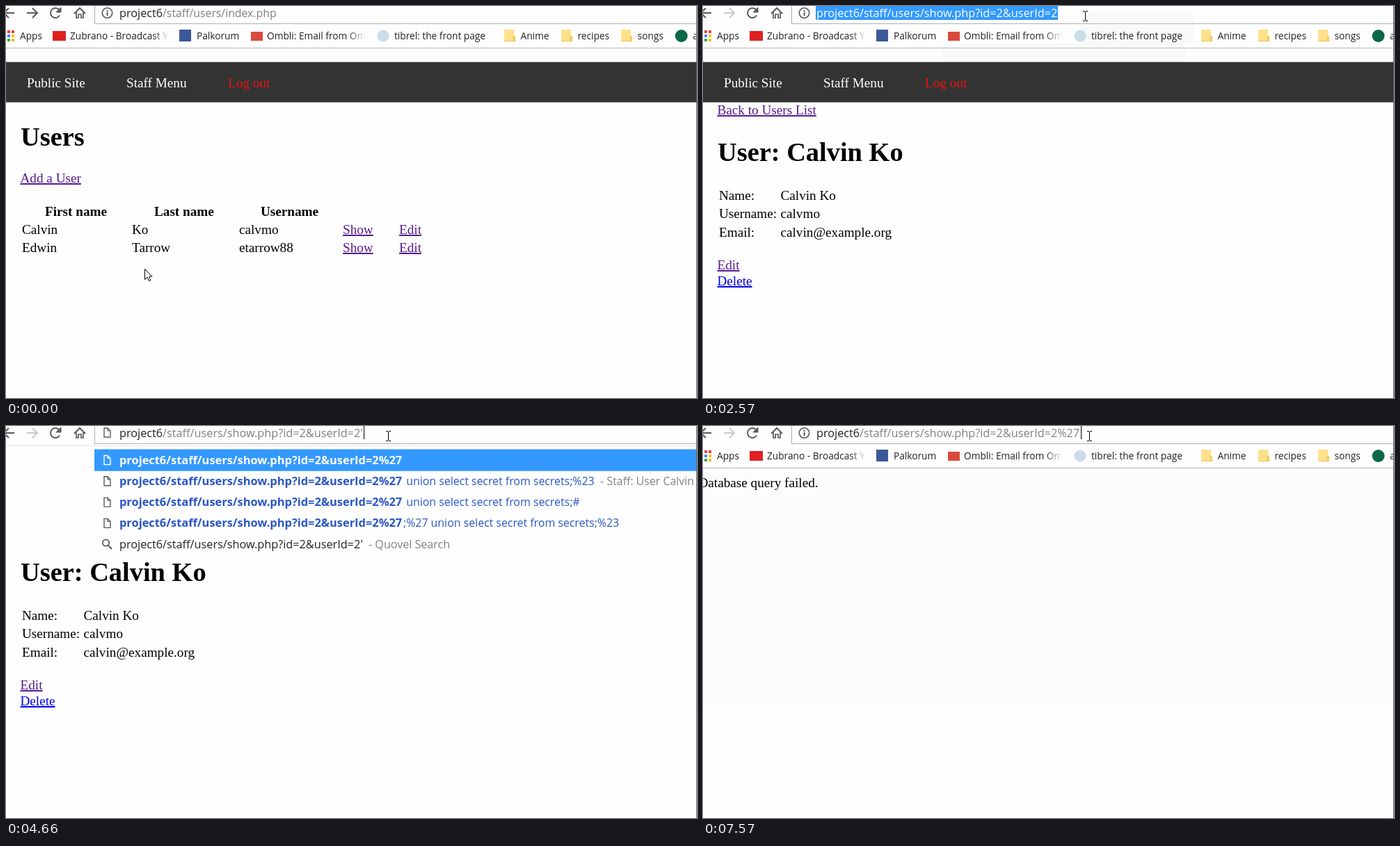
Write an HTML page with a canvas that moves like this. It is 993 by 564 pixels and loops after 8 s.

```html
<!DOCTYPE html>
<html lang="en">
<head>
<meta charset="utf-8">
<title>Staff pages</title>
<style>
html, body { margin: 0; width: 100%; height: 100%; overflow: hidden; background: #fefefe; }
canvas { display: block; }
</style>
</head>
<body>
<canvas id="stage" width="993" height="564"></canvas>
<script>
const ctx = document.getElementById('stage').getContext('2d');
const LOOP = 8000;
const SERIF = '"Liberation Serif", serif';
const SANS = '"Open Sans", sans-serif';
const INK = '#000', GREY = '#808080', ICON = '#5a5a5a', BLUE = '#3399ff';
const PURPLE = '#551a8b', LINK = '#0000ee', PAPER = '#fefefe', LINKBLUE = '#2a56c6';
const SHOW_URL = '/staff/users/show.php?id=2&userId=2';

// Each pose holds until the next one: start time, shape, x, y.
const pointer = [
  [0, 'arrow', 199, 378], [260, 'arrow', 290, 357], [380, 'arrow', 397, 334],
  [530, 'arrow', 475, 326], [680, 'hand', 480, 325], [820, 'hand', 482, 327],
  [940, 'hand', 484, 328], [1490, 'arrow', 464, 242], [1640, 'arrow', 491, 122],
  [1760, 'arrow', 511, 55], [1880, 'arrow', 536, 26], [2000, 'beam', 546, 16],
  [2150, 'beam', 548, 15], [2570, 'beam', 549, 14], [6720, 'beam', 552, 14],
  [6840, 'beam', 555, 14]
];
const within = (t, ...spans) => spans.some(([a, b]) => t >= a && t < b);

function rect(x, y, w, h, color) {
  ctx.fillStyle = color;
  ctx.fillRect(x, y, w, h);
}

function text(str, x, y, size, font, color = INK, weight = 400) {
  ctx.font = `${weight} ${size}px ${font}`;
  ctx.fillStyle = color;
  ctx.fillText(str, x, y);
  return ctx.measureText(str).width;
}

const serif = (str, x, y, color) => text(str, x, y, 19.2, SERIF, color);
const bold = (str, x, y, size = 19.2) => text(str, x, y, size, SERIF, INK, 700);
const sans = (str, x, y, color, size = 16.25) => text(str, x, y, size, SANS, color);

function link(str, x, y, color = PURPLE) {
  const w = serif(str, x, y, color);
  rect(x, y + 1, w, 2, color);
}

function line(points, color, width = 2, closed = false, fill = null) {
  ctx.beginPath();
  points.forEach(([x, y], i) => i ? ctx.lineTo(x, y) : ctx.moveTo(x, y));
  if (closed) ctx.closePath();
  if (fill) { ctx.fillStyle = fill; ctx.fill(); }
  ctx.strokeStyle = color;
  ctx.lineWidth = width;
  ctx.stroke();
}

function arc(x, y, r, from, to, color, width = 2) {
  ctx.beginPath();
  ctx.arc(x, y, r, from, to);
  ctx.strokeStyle = color;
  ctx.lineWidth = width;
  ctx.stroke();
}

function disc(x, y, r, color) {
  ctx.beginPath();
  ctx.arc(x, y, r, 0, 7);
  ctx.fillStyle = color;
  ctx.fill();
}

function pageIcon(x, y, color) {
  line([[x - 4, y - 6], [x + 1, y - 6], [x + 5, y - 2], [x + 5, y + 7], [x - 4, y + 7]], color, 1.4, true);
  line([[x + 1, y - 6], [x + 1, y - 2], [x + 5, y - 2]], color, 1.2);
}

function navArrow(x, dir, color) {
  line([[x - 8 * dir, 10], [x + 7 * dir, 10]], color);
  line([[x, 3], [x + 7 * dir, 10], [x, 17]], color);
}

function toolbar(t) {
  navArrow(4, -1, ICON);
  navArrow(38, 1, t < 1220 ? ICON : '#c9c9c9');
  arc(71, 10, 7, 0.5, 5.5, ICON);
  line([[79, 2], [79, 9], [72, 9]], ICON, 1, true, ICON);
  line([[98, 11], [106, 3], [114, 11]], ICON);
  line([[101, 9], [101, 17], [104, 17], [104, 12], [108, 12], [108, 17], [111, 17], [111, 9]], ICON, 1.7);
  rect(127, 0, 1, 25, '#b0b0b0');
  rect(127, 25, 866, 1, '#b0b0b0');
  if (within(t, [4660, 5400])) {
    pageIcon(145, 9, ICON);
  } else {
    arc(145.5, 10, 7.2, 0, 7, ICON, 1.6);
    rect(144.6, 9, 2, 5, ICON);
    rect(144.6, 6, 2, 2, ICON);
  }
}

function address(t) {
  const path = t < 1220 ? '/staff/users/index.php'
    : SHOW_URL + (t >= 5400 ? '%27' : t >= 4660 ? "'" : '');
  const end = t >= 5400 ? 543 : t >= 4660 ? 514 : 510;
  const selected = within(t, [2300, 2840], [6990, 7570]);
  if (selected) rect(162, 0, end - 162, 20, BLUE);
  const host = sans('project6', 163, 15.5, selected ? '#fff' : '#222');
  sans(path, 163 + host, 15.5, selected ? '#fff' : GREY, t < 1220 ? 15.8 : 16.25);
  if (within(t, [2840, 3350], [3920, 4370], [4660, 5260], [7570, LOOP])) rect(end, 0, 1, 19, INK);
}

function fadeRight(x, w) {
  const g = ctx.createLinearGradient(x, 0, x + w, 0);
  g.addColorStop(0, 'rgba(254,254,254,0)');
  g.addColorStop(1, PAPER);
  rect(x, 32, w + 14, 22, g);
}

function folder(x) {
  rect(x, 34, 14, 17, '#ffe08a');
  rect(x + 12, 43, 4, 8, '#f5ce66');
  rect(x, 50, 16, 1, '#ecc55f');
}

function bookmarks() {
  const label = (str, x) => sans(str, x, 48, '#222', 13.7);
  const dots = ['#ea4335', '#ea4335', '#4285f4', '#fbbc05', '#34a853', '#fbbc05'];
  dots.forEach((c, i) => rect(i % 2 ? 8 : 2, 35 + 6 * (i >> 1), 4, 4, c));
  label('Apps', 20);
  rect(67, 36, 19, 14, '#e02020');
  label('Zubrano - Broadcast Y', 92);
  fadeRight(212, 23);
  rect(249, 34, 17, 17, '#3b5998');
  label('Palkorum', 274);
  rect(352, 37, 17, 13, '#d94a3d');
  label('Ombli: Email from Omb', 375);
  fadeRight(490, 27);
  disc(542, 43, 8.5, '#c9dcea');
  label('tibrel: the front page', 558);
  [['Anime', 716], ['recipes', 798], ['songs', 884]].forEach(([name, x]) => {
    folder(x);
    label(name, x + 23.5);
  });
  disc(970.5, 43, 9, '#0b6848');
  label('a', 987);
  rect(0, 60, 993, 1, '#b6b6b6');
}

function navBar() {
  rect(0, 80.6, 993, 58, '#333');
  serif('Public Site', 30, 117, '#fff');
  serif('Staff Menu', 173, 117, '#fff');
  serif('Log out', 319, 117, '#ee1111');
}

function usersPage() {
  navBar();
  bold('Users', 21, 201, 38.4);
  link('Add a User', 20.5, 254);
  bold('First name', 56, 302);
  bold('Last name', 213, 302);
  bold('Username', 366, 302);
  [['Calvin', 'Ko', 'calvmo'], ['Edwin', 'Tarrow', 'etarrow88']].forEach((row, i) => {
    const y = 328 + 26 * i;
    row.forEach((cell, col) => serif(cell, [23, 181, 335][col], y));
    link('Show', 484, y);
    link('Edit', 565, y);
  });
}

function userPage() {
  navBar();
  link('Back to Users List', 20.5, 156);
  bold('User: Calvin Ko', 21, 223, 38.4);
  [['Name:', 'Calvin Ko'], ['Username:', 'calvmo'], ['Email:', 'calvin@example.org']].forEach(([key, value], i) => {
    const y = 279 + Math.round(26.3 * i);
    serif(key, 23, y);
    serif(value, 111.5, y);
  });
  link('Edit', 20.5, 379);
  link('Delete', 20.5, 402, LINK);
}

function errorPage() {
  rect(0, 61, 993, 344, '#fcfcfc');
  serif('Database query failed.', -6.5, 88);
}

function suggestions() {
  rect(0, 27, 993, 160, PAPER);
  rect(0, 28, 993, 1, '#e4e4e4');
  rect(127, 33.5, 866, 31.3, BLUE);
  const tails = ['', ' union select secret from secrets;%23', ' union select secret from secrets;#', ';%27 union select secret from secrets;%23'];
  tails.forEach((tail, i) => {
    const y = 54.5 + 30.3 * i;
    pageIcon(145, y - 6, i ? ICON : '#fff');
    text('project6' + SHOW_URL + '%27', 163, y, 16.4, SANS, i ? LINKBLUE : '#fff', 700);
    sans(tail, 571, y, LINKBLUE, 15.9);
  });
  sans('- Staff: User Calvin', 854, 84.8, GREY, 15.9);
  arc(143.5, 168, 4.7, 0, 7, ICON, 1.8);
  line([[147, 172], [152, 177]], ICON);
  sans('project6' + SHOW_URL + "'", 163, 176, '#222');
  sans('- Quovel Search', 521, 176, GREY, 16.1);
}

const shapes = {
  arrow() {
    line([[0.5, 0.5], [0.5, 15.5], [4, 12.2], [6.4, 17.6], [8.8, 16.6], [6.5, 11.4], [11, 11.2]], INK, 1, true, '#fff');
  },
  hand() {
    line([[5.5, 12], [5.5, 1.5], [7.5, 1.5], [7.5, 8], [15, 9.5], [15, 14], [13, 19.5], [6, 19.5],
      [1, 12.5], [2, 11], [5.5, 13.5]], INK, 1, true, '#fff');
  },
  beam() {
    line([[-3, -6.5], [-1, -6.5], [0.5, -5.5], [2, -6.5], [4, -6.5]], INK, 1);
    line([[0.5, -5.5], [0.5, 6.5]], INK, 1);
    line([[-3, 7.5], [-1, 7.5], [0.5, 6.5], [2, 7.5], [4, 7.5]], INK, 1);
  }
};

function drawPointer(t) {
  const [, shape, x, y] = pointer.filter(p => p[0] <= t).pop();
  ctx.save();
  ctx.translate(x, y);
  shapes[shape]();
  ctx.restore();
}

function draw(t) {
  rect(0, 0, 993, 564, PAPER);
  if (t < 1220) usersPage();
  else if (t < 5400) userPage();
  else errorPage();
  if (within(t, [2000, 4660])) {
    rect(343, 54, 352, 20, 'rgba(0,0,0,0.02)');
    rect(543, 8, 162, 46, 'rgba(0,0,0,0.02)');
  }
  if (within(t, [4660, 5400])) suggestions();
  else bookmarks();
  toolbar(t);
  address(t);
  rect(992, 0, 1, 564, '#666');
  drawPointer(t);
}

const start = performance.now();
function tick() {
  draw((performance.now() - start) % LOOP);
  requestAnimationFrame(tick);
}
tick();
</script>
</body>
</html>
```
